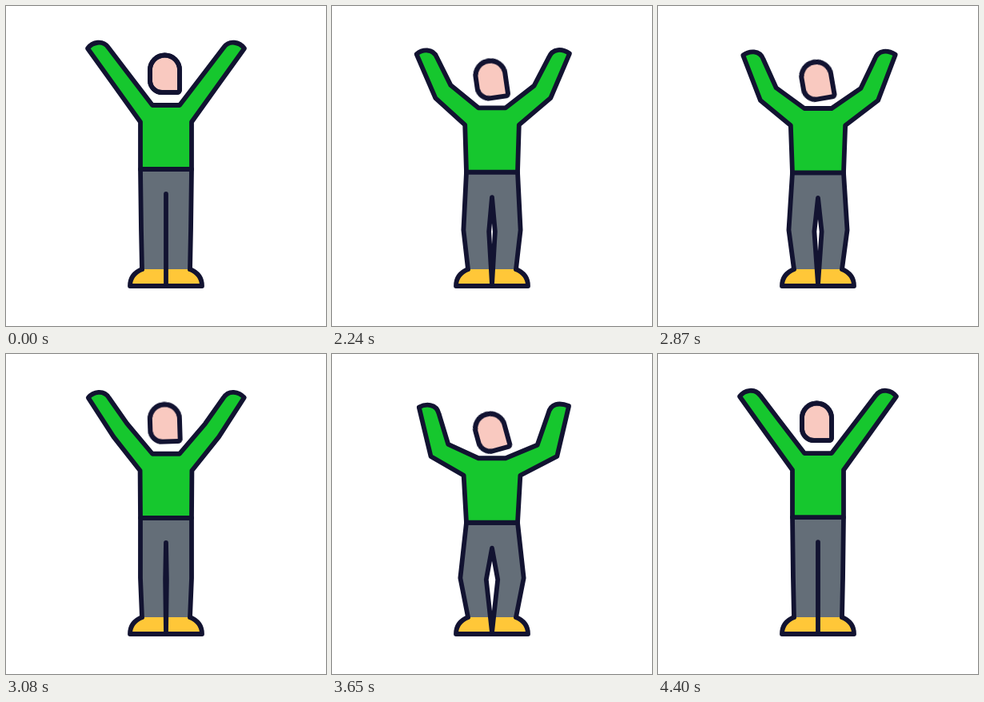
Recreate the animation shown at these times as an HTML page without scripts. Size 400 px wide and 400 px high, loop 4460 ms.

```html
<!DOCTYPE html>
<html lang="en">
<head>
<meta charset="utf-8">
<title>Cheering figure</title>
<style>
  html, body { margin: 0; width: 100%; height: 100%; overflow: hidden; background: #fff; }
  svg { display: block; width: 100vw; height: 100vh; }
  .line { stroke: #121331; stroke-width: 5.8; stroke-linecap: round; stroke-linejoin: round; }
  .morph { d: var(--up); animation: dip 4460ms infinite; }
  .head { transform-origin: 198.5px 85px; animation: nod 4460ms infinite; }

  /* Rest, then two dips of 1200 ms: quick down, slower up */
  @keyframes dip {
    0%, 45.516%, 72.422%, 99.327%, 100% {
      d: var(--up);
      animation-timing-function: cubic-bezier(.33, 0, .4, 1);
    }
    57.175%, 84.081% {
      d: var(--down);
      animation-timing-function: cubic-bezier(.5, 0, .6, 1);
    }
  }
  @keyframes nod {
    0%, 45.516%, 72.422%, 99.327%, 100% {
      transform: translate(0, 0) rotate(0deg);
      animation-timing-function: cubic-bezier(.33, 0, .4, 1);
    }
    57.175%, 84.081% {
      transform: translate(.5px, 13.5px) rotate(-16deg);
      animation-timing-function: cubic-bezier(.5, 0, .6, 1);
    }
  }

  .legs {
    --up: path("M170 329 L169 280 L168 204 L232 204 L231 280 L230 329");
    --down: path("M170 329 L160 280 L168 211 L232 211 L240 280 L230 329");
  }
  .gap {
    --up: path("M200 235 L200 282 L200 348 L200 282 Z");
    --down: path("M200 243 L192.5 282 L200 348 L207.5 282 Z");
  }
  .sweater {
    --up: path("M102 53 C108 45 121 42 128 52 L152 83.4 L183 124 L217 124 L248 83.4 L272 52 C279 42 292 45 298 53 L264 100.4 L232 145 L232 204 L168 204 L168 145 L136 100.4 Z");
    --down: path("M109 67 C117 63 131 62 134 76 L145 114 L183 130.5 L217 130.5 L257 115 L270 76 C273 62 284 61 296 65.5 L282 129 L235.5 152 L232 211 L168 211 L164.5 152 L123 129 Z");
  }
</style>
</head>
<body>
<svg viewBox="0 0 400 400">
  <path class="line" fill="#ffc738" d="M170 329 C158 334 155 342 155 350 H245 C245 342 242 334 230 329"/>
  <path class="line morph legs" fill="#646e78"/>
  <path class="line morph gap" fill="#fff"/>
  <path class="line morph sweater" fill="#16c72e"/>
  <g class="head">
    <path id="face" fill="#f9c9c0" d="M180 80 A18.5 18.5 0 0 1 217 80 V105 a3 3 0 0 1 -3 3 H195 A15 15 0 0 1 180 93 Z"/>
    <path fill="#b26836" d="M181 76 Q189 69 197 76 Q204 71 215 73 A18.5 18.5 0 0 0 181 76 Z"/>
    <use href="#face" class="line" fill="none"/>
    <path class="line" fill="none" d="M180 80 A18.5 18.5 0 0 1 217 80 V105 a3 3 0 0 1 -3 3 H195 A15 15 0 0 1 180 93 Z"/>
  </g>
</svg>
</body>
</html>
```
